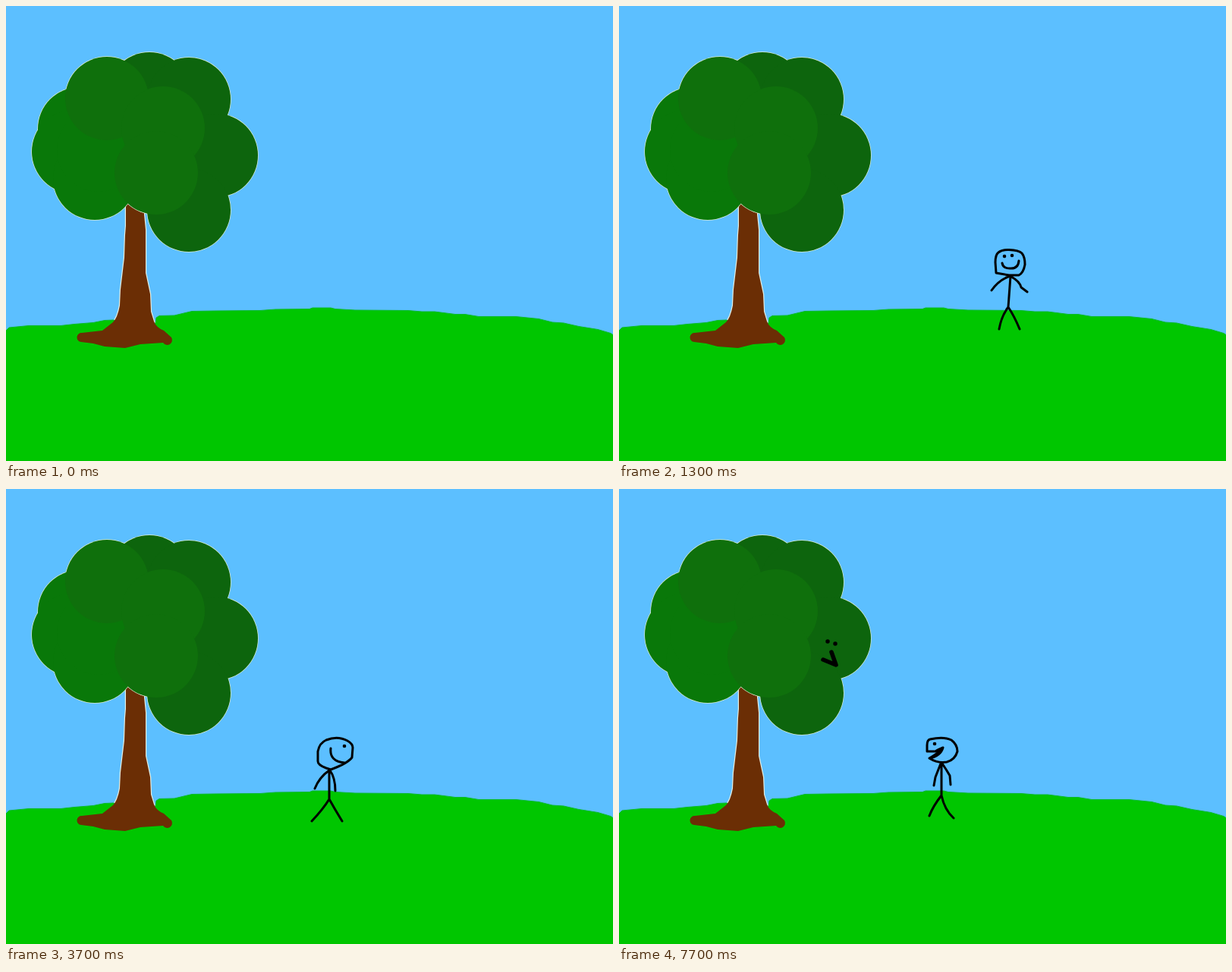
Recreate the animation shown at these times as an HTML page. Size 800x600 px, loop 8 s.

```html
<!DOCTYPE html>
<html lang="en">
<head>
<meta charset="utf-8">
<title>Walk to the tree</title>
<style>
  html, body { margin: 0; width: 100%; height: 100%; overflow: hidden; background: #5cbfff; }
  svg { display: block; width: 100%; height: 100%; }
  .ink { fill: none; stroke: #000; stroke-width: 3; stroke-linecap: round; stroke-linejoin: round; }
</style>
</head>
<body>
<svg viewBox="0 0 800 600">
  <defs>
    <path id="trunk" d="M158 255L158 290 157 302 156 332 151 374 150 395Q147 411 141 417L127 428 100 431A6 6 0 0 0 99 443L115 445 130 449 157 451 177 446 207 444A6 6 0 0 0 218 437L208 428Q198 424 195 416L191 403 190 380 184 352 184 295 182 275V255Z"/>
  </defs>
  <rect width="800" height="600" fill="#5cbfff"/>
  <use href="#trunk" fill="none" stroke="#e4eee4" stroke-width="2.4"/>
  <path fill="#00c600" stroke="#0cba34" stroke-width="1" d="M-2 430L4 424 30 421.500 72 421.500 90 419.500 115 417.500 130 414.500 142 414 165 430 197 418 198 411 202 408.500 222 408 245 402.500 275 402 335 401.500 355 400 400 399.500 404 398 428 398 434 399.500 460 401 530 401.500 548 403 565 403 592 406.500 605 406.500 623 409.500 672 409.500 702 412.500 720 417 735 418 755 422.500 780 426.500 797 431.500 802 435V602H-2Z"/>
  <use href="#trunk" fill="#6b2e05"/>
  <g id="leaves"></g>
  <path id="treeFace" class="ink" style="stroke-width:5.500"/>
  <path id="lines" class="ink"/>
  <path id="dots" class="ink" style="stroke-width:4.600"/>
</svg>
<script>
const $ = id => document.getElementById(id);

// Foliage: circles of one radius, back to front, over a pale rim.
const foliage = [
  ["#0d650d", [[189, 116], [241, 123], [277, 197], [241, 269]]],
  ["#097809", [[97, 162], [89, 192], [117, 227], [122, 190]]],
  ["#0f700c", [[133, 122], [207, 161], [198, 220]]]
];
const discs = (r, color) => foliage.map(([fill, spots]) => spots.map(([x, y]) =>
  `<circle cx="${x}" cy="${y}" r="${r}" fill="${color || fill}"/>`).join("")).join("");
$("leaves").innerHTML = discs(55.7, "#dcecd0") + discs(55);

const dot = (...points) => points.map(([x, y]) => `M${x} ${y}h.01`).join("");

// Poses: [line work, eyes]
const stride = [
  "M674 351Q678 344 688 345L699 346 708 352V364Q706 371 702 375L682 376Q672 374 672 364V356Z" +
  "M679 361Q680 369 690 369Q701 369 700 360M691 377Q681 384 679 397M691 378L700 389 716 399" +
  "M692 377V414H678Q673 414 673 419V443M692 414L694 427 704 434 712 443",
  dot([681, 352], [691, 352])];
const wide = [
  "M500 325Q505 321 514 321.500Q527 322 531 326Q535 331 535 341Q533 352 527 355L514 355 497 352 496 338Q496 328 500 325Z" +
  "M505 339Q506 346 515 346Q526 347 527 336M513 357Q500 362 491 375M517 357Q528 363 530 371L538 377" +
  "M516 356L513 397Q504 409 501 426M513 397Q521 409 528 426",
  dot([508, 330], [518, 329])];
const narrow = [
  "M5 4Q16 -1 27 4Q33 9 32 19Q30 31 22 33L8 32Q1 29 1 17Q1 8 5 4Z" +
  "M9 18Q10 25 17 25Q25 25 25 17M16 34Q9 43 7 57M17 34Q24 43 26 56M17 34V75Q14 88 11 103M17 75Q20 88 24 103",
  dot([12, 9], [21, 9])];
const body = "M425 362V404Q414 418 409 431M425 404Q429 423 441 434M424 362L417 380 415 391M426 362Q432 371 436 378L437 390";
const crown = "Q428 326 438 331Q446 337 446 346Q443 357 432 360";
const stand = "M410 330" + crown + "Q420 363 411 357Q406 353 406 342Q406 332 410 330Z" +
  "M413 344Q415 353 426 353Q438 352 439 344" + body;
const front = [stand, dot([417, 336], [430, 336])];
const lookRight = [
  "M411 346Q413 335 422 331Q437 325 450 332Q457 336 457 341L456 354Q450 362 428 370L422 368Q411 364 411 359Z" +
  "M428 342Q426 359 446 361M426 371Q413 380 407 395M427 371Q434 381 434 398" +
  "M426 371V409Q418 422 403 438M426 409L434 423 443 438",
  dot([446, 339])];
const talk = [
  "M406 346V338Q406 331 410 330" + crown +
  "Q420 362 409 355Q424 352 427 341Q420 344 417 346ZM409 355Q420 349 426 342" + body,
  dot([416, 336])];
const entering = ["M802 411L795 423M802 434H787Q781 434 781 439V463", ""];

const mouth = "M280 215L286 232 269 225";
const closedMouth = "M265 222L286 230";
const treeEyes = dot([272, 197], [284, 198]);

// Steps: [start, pose, transform, tree face]
const steps = [
  [0, ["", ""]],
  [100, entering],
  [300, stride, "translate(734 349) scale(.88 1.06) translate(-671 -343)"],
  [500, stride],
  [700, narrow, "translate(625 329) scale(.94 .97)"],
  [900, wide, "translate(86 3)"],
  [1100, narrow, "translate(541 323)"],
  [1300, wide],
  [1500, narrow, "translate(448 328) scale(1 .95)"],
  [1700, front],
  [2700, front, "translate(2 3)", dot([272, 203], [283, 205]) + "M279 216L286 232 264 225"],
  [3700, lookRight],
  [4700, front],
  [5700, [stand, "M415 337h3M428 337h3"], "", treeEyes + mouth],
  [6200, [stand, dot([413, 337], [426, 337])], "", treeEyes + closedMouth],
  [6700, [stand, dot([416, 336])], "", treeEyes + mouth],
  [7700, talk, "", dot([275, 201], [285, 204]) + mouth]
];

let shown;
function draw(now) {
  const time = now % 8000;
  const step = steps.findLast(([start]) => start <= time);
  if (step !== shown) {
    const [, [lines, dots], move = "", face = ""] = shown = step;
    $("lines").setAttribute("d", lines);
    $("dots").setAttribute("d", dots);
    for (const id of ["lines", "dots"]) $(id).setAttribute("transform", move);
    $("treeFace").setAttribute("d", face);
  }
  requestAnimationFrame(draw);
}
draw(performance.now());
</script>
</body>
</html>
```
